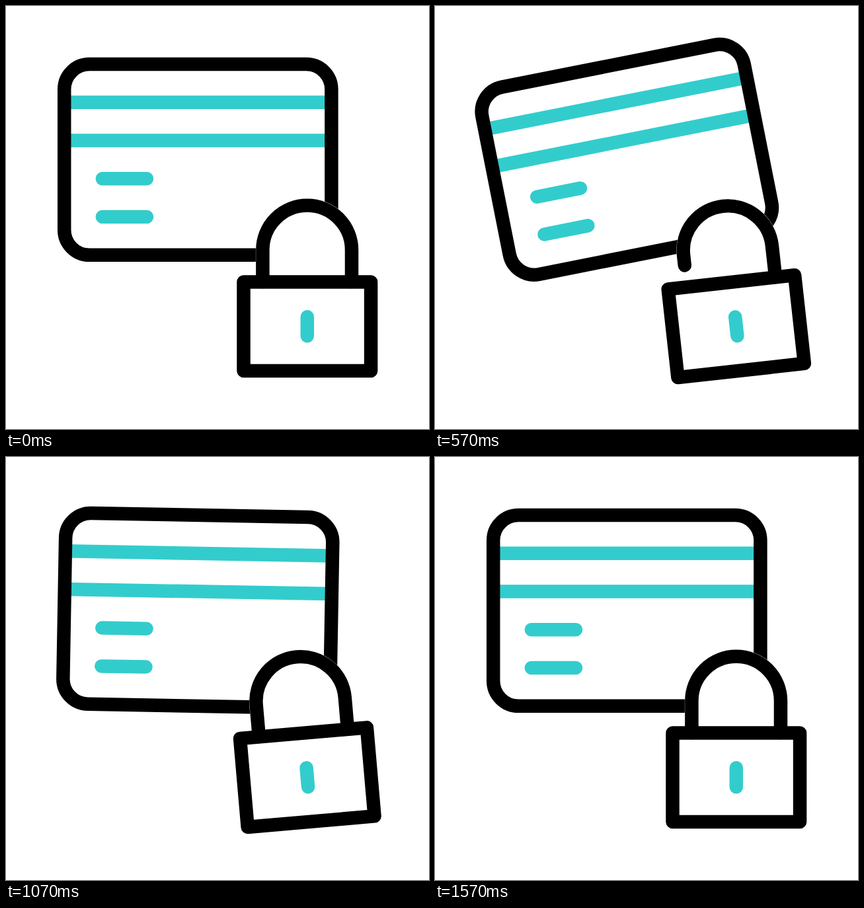
Animation, 640 px wide and 640 px high, one loop 2000 ms. Source, as an HTML page:

```html
<!DOCTYPE html>
<html lang="en">
<head>
<meta charset="utf-8">
<title>Card and padlock</title>
<style>
  html, body { margin: 0; width: 100%; height: 100%; overflow: hidden; background: #fff; }
  svg { display: block; width: 100vw; height: 100vh; }
  .line { fill: none; stroke-width: 20.5; stroke-linecap: round; stroke-linejoin: round; }
  .black { stroke: #000; }
  .teal { stroke: #3cc; }
  .back { fill: #fff; stroke: #fff; stroke-width: 21; stroke-linejoin: round; }
</style>
</head>
<body>
<svg viewBox="0 0 640 640">
  <g id="sparks">
    <path class="line teal"/>
    <path class="line teal"/>
  </g>
  <g id="card">
    <rect class="back" x="88.2" y="88" width="404.2" height="288.8" rx="38"/>
    <path class="line teal" style="stroke-linecap: butt" d="M88 145.8H492M88 203.5H492"/>
    <path class="line teal" d="M145.8 261.2H213M145.8 319H213"/>
    <rect class="line black" x="88.2" y="88" width="404.2" height="288.8" rx="38"/>
  </g>
  <g id="lock">
    <path class="back" d="M523 417V369a67.3 67.3 0 0 0-134.6 0V417Z"/>
    <rect class="back" x="359.5" y="417.4" width="192.6" height="134.5"/>
    <path id="shackle" class="line black" d="M523 417V369a67.3 67.3 0 0 0-134.6 0V417"/>
    <rect class="line black" x="359.5" y="417.4" width="192.6" height="134.5"/>
    <path class="line teal" d="M455.8 470.3V499.2"/>
  </g>
</svg>
<script>
  const LOOP = 2000, STEP = 100 / 3;
  const byId = id => document.getElementById(id);
  const [card, lock, sparks, shackle] = ['card', 'lock', 'sparks', 'shackle'].map(byId);
  const shackleLength = shackle.getTotalLength();

  // [time in ms, value], eased in and out between neighbours
  const cardTurn = [[100, 0], [440, -16.1], [855, 6.9], [1233, -3], [1567, 0]];
  const lockTurn = [[0, 0], [375, -24.8], [765, 13.2], [1085, -5.1], [1400, 1.5], [1567, 0]];
  const shackleCut = [[0, 0], [400, 66], [733, 0]];
  const sparkHead = [[600, 30], [820, 95]];
  const sparkTail = [[635, 30], [855, 95]];
  const sparkAngles = [164.5, 106.5];

  function valueAt(keys, t) {
    if (t <= keys[0][0]) return keys[0][1];
    for (let i = 1; i < keys.length; i++) {
      const [t0, a] = keys[i - 1], [t1, b] = keys[i];
      if (t < t1) return a + (b - a) * (1 - Math.cos(Math.PI * (t - t0) / (t1 - t0))) / 2;
    }
    return keys[keys.length - 1][1];
  }

  // 30 poses per second, held for 30, 40 and 30 ms in turn
  function poseTime(ms) {
    const rest = ms % 100;
    return (Math.floor(ms / 100) * 3 + (rest >= 70 ? 2 : rest >= 30 ? 1 : 0)) * STEP;
  }

  function turn(el, angle, x, y) {
    el.setAttribute('transform', `rotate(${angle} ${x} ${y})`);
  }

  function drawSparks(t) {
    const head = valueAt(sparkHead, t), tail = valueAt(sparkTail, t);
    sparks.style.display = head - tail > 0.1 ? '' : 'none';
    sparkAngles.forEach((deg, i) => {
      const a = deg * Math.PI / 180;
      const point = r => `${341 + r * Math.cos(a)} ${418 + r * Math.sin(a)}`;
      sparks.children[i].setAttribute('d', `M${point(tail)}L${point(head)}`);
    });
  }

  function draw(ms) {
    const t = poseTime(ms % LOOP);
    const lockAngle = valueAt(lockTurn, t);
    turn(card, valueAt(cardTurn, t), 290.3, 232.4);
    turn(lock, lockAngle, 455.8, 484.8);
    turn(sparks, lockAngle, 455.8, 484.8);
    shackle.style.strokeDasharray = `${shackleLength - valueAt(shackleCut, t)} 999`;
    drawSparks(t);
  }

  const start = performance.now();
  function tick() {
    draw(performance.now() - start);
    requestAnimationFrame(tick);
  }
  tick();
</script>
</body>
</html>
```
